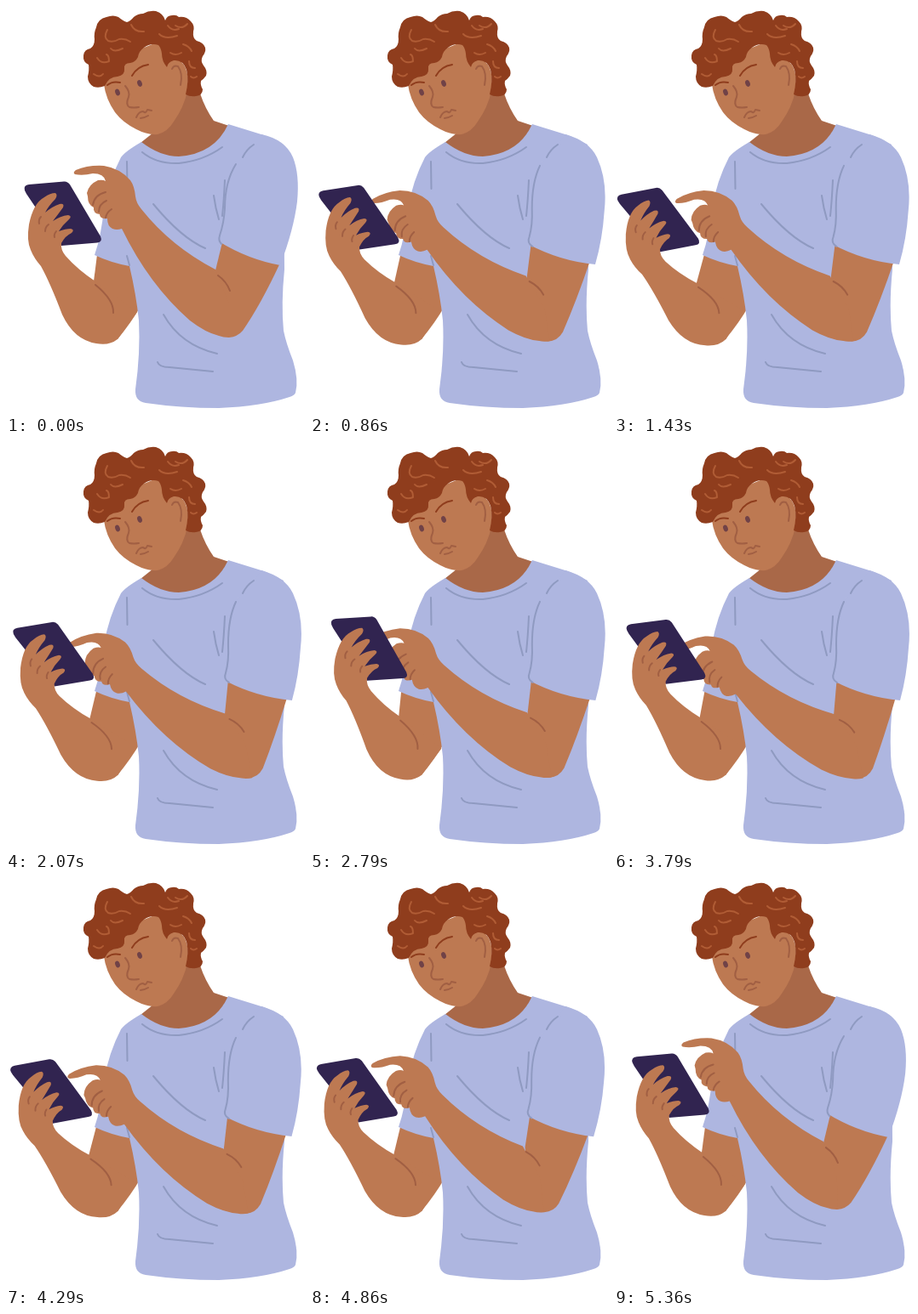
These frames come from a looping animation (350 px wide and 480 px high, 5430 ms). An HTML page:

```html
<!DOCTYPE html>
<html lang="en">
<head>
<meta charset="utf-8">
<title>Man tapping a phone</title>
<style>
html, body { margin: 0; width: 100%; height: 100%; overflow: hidden; background: #fff; }
svg { display: block; width: 100vw; height: 100vh; }
.skin { fill: #bd7952; }
.shade { fill: #a96848; }
.hair { fill: #8f3d1d; }
.shirt { fill: #aeb6e0; }
.phone { fill: #312450; }
.line { fill: none; stroke-width: 2; stroke-linecap: round; stroke-linejoin: round; }
.crease { stroke: #a15f43; }
.curl { stroke: #b05c35; }
.fold { stroke: #8f9ac1; }
.brow { stroke: #8f3d1d; }
</style>
</head>
<body>
<svg viewBox="0 0 350 480" preserveAspectRatio="xMidYMid meet">
  <!-- far upper arm -->
  <path id="farUpper" class="skin"/>

  <!-- neck and head -->
  <path class="shade" d="M212 95L228 103Q234 121 244 135L262 141Q245 180 202 180Q175 178 158 161L173 149Z"/>
  <path class="skin" d="M115 92Q117 109 128 125Q137 137 153 145Q166 152 178 151Q190 148 197 136Q209 119 213 100Q216 75 206 66L184 40L140 58Z"/>
  <path class="hair" d="M116 94Q109 97 103 95Q96 91 96 83Q98 75 97 69Q90 66 91 58Q92 51 99 50Q104 47 104 39Q103 32 106 25Q108 15 118 13Q126 10 132 13Q138 18 142 19Q146 18 150 13Q155 9 161 9Q168 5 176 6Q185 9 187 17Q189 11 195 11Q200 10 203 13Q212 12 217 18Q222 23 220 30Q219 38 224 41Q232 43 234 49Q235 54 231 59Q228 65 232 70Q237 76 235 82Q232 86 229 88Q228 93 231 98Q231 105 223 106Q216 107 211 104Q215 88 212 75Q208 63 197 64Q190 66 189 72Q183 65 183 56Q182 49 179 46Q170 43 162 49Q156 53 155 60Q152 66 146 67Q138 67 139 74Q140 81 131 83Q121 83 116 94Z"/>
  <g class="line curl">
    <path d="M119 28Q114 37 120 41Q126 43 133 39Q140 38 146 42"/>
    <path d="M147 22Q151 31 162 30M180 33Q187 40 201 35M190 23Q195 30 203 27M199 23Q207 28 213 21"/>
    <path d="M123 50Q127 55 137 50M107 61Q112 69 121 65Q121 58 118 57M103 80Q110 85 114 80"/>
    <path d="M193 55Q199 59 206 55M208 45Q215 47 218 53M215 65Q215 73 222 73M217 83Q220 86 224 83"/>
  </g>
  <g class="line brow"><path d="M119 93Q125 88 134 90M148 82Q154 71 167 69"/></g>
  <g fill="#704247">
    <ellipse cx="131" cy="101.5" rx="2.7" ry="4" transform="rotate(-20 131 101.5)"/>
    <ellipse cx="157" cy="91" rx="2.7" ry="4" transform="rotate(-20 157 91)"/>
  </g>
  <g class="line crease">
    <path d="M140 94Q146 101 144 107Q140 116 145 119Q150 120 156 119"/>
    <path d="M153 131Q156 124 161 124Q164 127 166 122L171 123M158 132Q162 132 167 129"/>
    <path d="M195 74Q197 69 202 71Q208 79 205 93"/>
  </g>

  <!-- shirt -->
  <path class="shirt" d="M159 160Q181 177 203 177Q245 174 261 139L303 152L326 163L327 310Q323 350 326 382Q329 397 337 417Q344 440 340 455Q339 458 333 460Q300 471 250 473Q205 473 164 467Q151 465 152 451Q158 408 156 370Q153 340 145 306Q123 302 104 293Q112 270 115 238Q121 205 135 178Q140 171 159 160Z"/>
  <g class="line fold">
    <path d="M160 172Q177 186 203 185Q232 182 254 166M142 183L142.500 215M142 294L145 305"/>
    <path d="M173 233Q206 273 234 285M185 363Q205 399 248 409M178 419Q180 425 192 425L243 430"/>
  </g>

  <!-- near arm -->
  <path id="nearUpper" class="skin"/>
  <g id="nearFore">
    <path class="skin" d="M82 193Q96 187 115 188Q134 191 146 205Q151 212 152 224Q153 232 159 239Q194 283 246 310L262 350L262 390Q255 390 250 388Q234 384 216 370Q168 328 136 262Q130 264 125 262Q119 259 119 250Q110 251 110 245Q102 244 103 237Q96 234 96 224L95 220Q97 210 108 205Q114 204 117 206Q115 197 102 197Q90 200 81 198Q78 196 82 193Z"/>
    <path class="line crease" d="M117 219Q104 222 102 234M118 229Q109 233 109 242M124 239Q118 243 117 249M249 317Q259 324 263 335"/>
  </g>
  <path id="sleeve" class="shirt"/>
  <path id="seam" class="line fold"/>
  <path class="line fold" d="M244 223Q246 238 250 251M257 205Q256 228 254 247M278 178Q282 169 291 163"/>

  <!-- far forearm with phone -->
  <g id="farFore">
    <path class="phone" d="M22 217Q20 211 27 210L68 206.500Q72 206 75 210L111 271Q114 278 107 278.500L65 282L24 221Z"/>
    <path class="skin" d="M58 220Q61 222 58 227Q50 235 46 243Q54 236 63 233Q69 232 67 237Q62 244 55 253Q64 247 73 246Q78 247 74 251Q67 257 62 265Q70 262 76 262Q81 263 77 267Q70 270 65 279Q64 287 70 294Q84 310 105 324L154 360L131 392Q121 400 106 397Q80 393 66 363Q52 326 41 306Q33 297 29 287Q24 276 27 257Q32 232 45 225Q52 220 58 220Z"/>
    <path class="line crease" d="M41 248Q38 251 39 256M50 257Q46 260 46 265M59 265Q56 269 57 272M105 328Q127 346 126 361"/>
  </g>
</svg>
<script>
const LOOP = 5430, STEPS = 76;
const $ = id => document.getElementById(id);
const draw = (id, d) => $(id).setAttribute('d', d);
const move = (id, m) => $(id).setAttribute('transform', m);

// Cosine easing between [time, value] keys
function track(keys, t) {
  let i = 1;
  while (i < keys.length - 1 && t > keys[i][0]) i++;
  const [t0, a] = keys[i - 1], [t1, b] = keys[i];
  const u = Math.min(1, Math.max(0, (t - t0) / (t1 - t0)));
  return a + (b - a) * (1 - Math.cos(Math.PI * u)) / 2;
}

// Blends the numbers of two paths of the same form
function blend(a, b, k) {
  const to = b.match(/[\d.]+/g);
  let i = 0;
  return a.replace(/[\d.]+/g, n => (+n + (to[i++] - n) * k).toFixed(2));
}

// Sideways swing of the phone, in pixels
const swing = [[0, 0], [140, -0.3], [780, -11.2], [1550, -18.5], [3010, 4.5], [4570, -18.5], [5430, 0]];
// Reach of the tapping arm: 0 raised, 1 fully down
const reach = [[0, 0], [140, 0], [800, .73], [1550, .73], [2280, 1], [3010, .73], [3790, 1], [4570, .73], [5430, 0]];

const UPPER = [
  'M256 270L246 311L250 385L262 390Q272 389 278 382Q300 350 323 300Z',
  'M262 275L258 322L270 390L286 396Q298 396 304 384Q318 345 331 300Z'];
const SLEEVE = [
  'M270 187L300 151Q328 157 337 178Q345 198 342 230Q338 263 322 305Q284 298 250 277Q257 260 258 220Z',
  'M270 187L300 151Q328 159 337 178Q350 206 346 242Q344 275 336 304Q294 300 258 281Q262 262 262 220Z'];
const SEAM = [
  'M270 186Q257 207 257 238Q256 255 251 270Q249 276 253 280',
  'M270 188Q261 207 261 238Q262 258 258 272Q255 279 262 283'];

function render(t) {
  const angle = track(swing, t) / 168;
  const c = Math.cos(angle), s = Math.sin(angle);
  move('farFore', `rotate(${angle * 180 / Math.PI} 128 385)`);
  const ix = 128 - 25 * c + 61 * s, iy = 385 - 61 * c - 25 * s;
  draw('farUpper', `M108 285L${ix} ${iy}L110 385L131 392Q148 371 157 355L148 300Z`);

  const p = track(reach, t), cloth = 1 - (1 - p) ** 2;
  move('nearFore', `translate(${27 * p ** 1.5} ${6 * p}) rotate(${-12 * p} 262 372)`);
  draw('nearUpper', blend(...UPPER, p));
  draw('sleeve', blend(...SLEEVE, cloth));
  draw('seam', blend(...SEAM, cloth));
}

const start = performance.now();
function tick() {
  const t = (performance.now() - start) % LOOP;
  const step = LOOP / STEPS;
  render(Math.floor(t / step) * step);
  requestAnimationFrame(tick);
}
tick();
</script>
</body>
</html>
```
